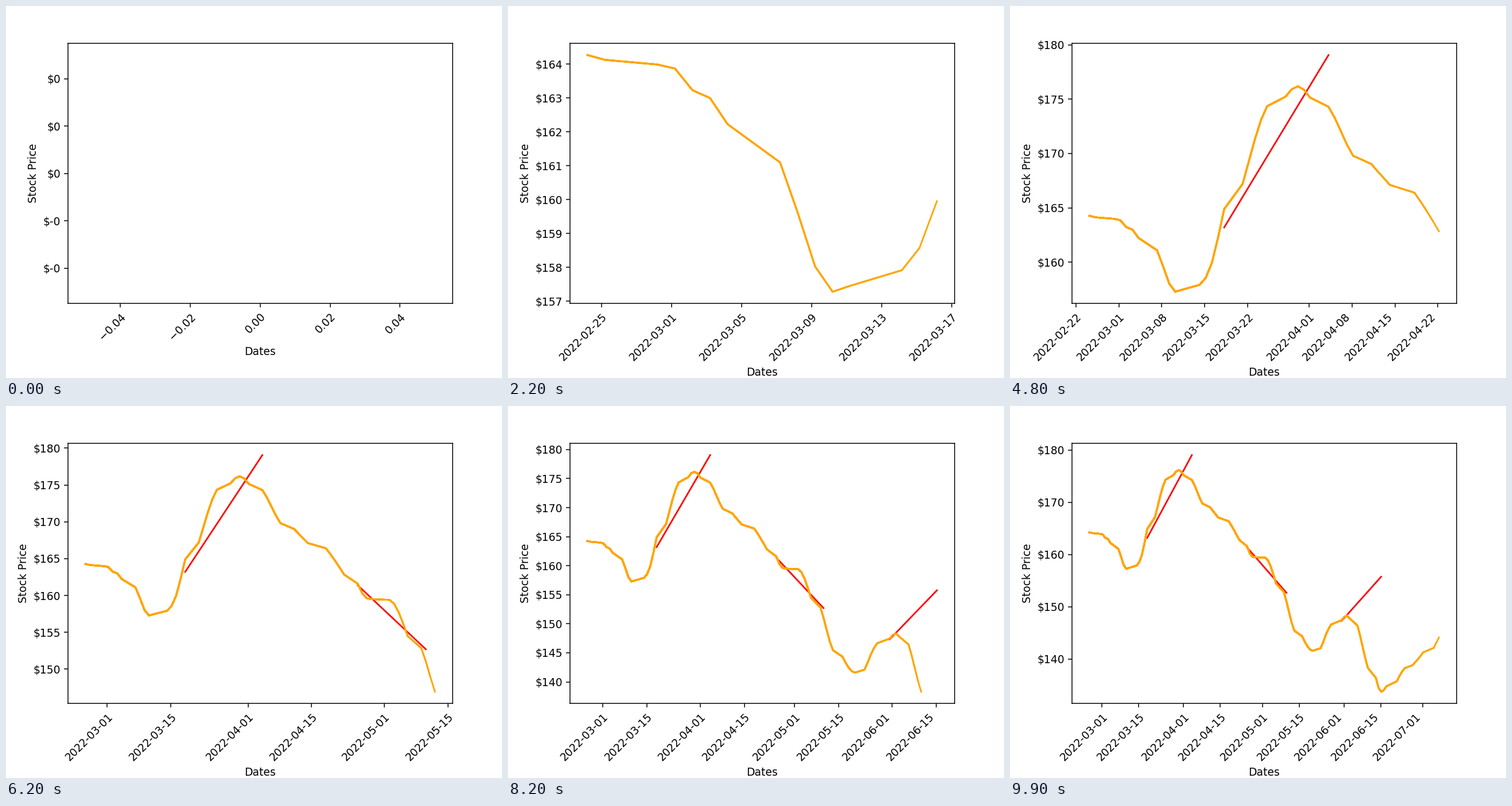
A matplotlib script for the animation above (10000 ms loop, 864x648 px).

```python
import numpy as np
import matplotlib.dates as mdates
import matplotlib.pyplot as plt
from matplotlib.animation import FuncAnimation
from matplotlib.ticker import AutoLocator, ScalarFormatter

FRAMES = 100
FIRST_CURVE = 8
EMPTY_LIMITS = (-0.055, 0.055)

# Turning points of the price curve: (trading day, price)
TURNS = [
    (0, 164.27), (2, 163.99), (3, 163.87), (4, 163.23), (5, 163.0),
    (7, 161.1), (10, 157.28), (13, 158.57), (17, 167.2), (21, 174.35),
    (24, 176.18), (27, 174.3), (31, 169.8), (36, 166.4), (40, 162.84),
    (43, 159.6), (46, 159.4), (51, 152.85), (55, 145.45), (60, 141.6),
    (64, 145.8), (68, 148.33), (74, 138.3), (77, 133.76), (82, 137.63),
    (88, 141.3), (91, 144.13),
]

# Forecast lines: first trading day -> (first price, last price)
FORECASTS = {16: (163.2, 179.06), 41: (161.38, 152.7), 66: (147.33, 155.77)}
FORECAST_SPAN = 11


def trading_days():
    """Trading days as date numbers, at New York midnight in UTC."""
    days = np.arange("2022-02-24", "2022-07-08", dtype="datetime64[D]")
    holidays = ["2022-04-15", "2022-05-30", "2022-06-20", "2022-07-04"]
    days = days[np.is_busday(days, holidays=holidays)]
    hours = np.where(days <= np.datetime64("2022-03-13"), 5, 4)
    return mdates.date2num(days) + hours / 24


def curve_through(points, count):
    """Cubic curve through the points that never overshoots them."""
    x, y = np.array(points).T
    rise = np.diff(y) / np.diff(x)
    before, after = np.r_[rise[0], rise], np.r_[rise, rise[-1]]
    slope = 2 * np.maximum(before * after, 0) / (before + after)

    day = np.arange(count)
    i = np.clip(np.searchsorted(x, day, "right") - 1, 0, len(rise) - 1)
    width = x[i + 1] - x[i]
    t = (day - x[i]) / width
    m0, m1, d = slope[i], slope[i + 1], rise[i]
    bend = 3 * d - 2 * m0 - m1 + t * (m0 + m1 - 2 * d)
    return y[i] + width * t * (m0 + t * bend)


dates = trading_days()
prices = curve_through(TURNS, len(dates))

fig, ax = plt.subplots(figsize=(6.4, 4.8), dpi=135)
fig.subplots_adjust(bottom=0.2, top=0.9)
ax.set_xlabel("Dates")
ax.set_ylabel("Stock Price")
ax.yaxis.set_major_formatter(lambda value, pos: f"${value:.0f}")

# Only the six starting ticks are anchored; ticks added later are not.
plt.setp(ax.get_xticklabels(), rotation=45, ha="right", rotation_mode="anchor")

number_axis = AutoLocator(), ScalarFormatter()
date_locator = mdates.AutoDateLocator()
date_axis = date_locator, mdates.AutoDateFormatter(date_locator)

# Each day adds one more full curve on top of the earlier ones.
layers = []
for day in range(len(dates)):
    curve, = ax.plot(dates[:day + 1], prices[:day + 1], color="orange")
    layers.append((day, curve))
    if day in FORECASTS:
        ends = dates[[day, day + FORECAST_SPAN]]
        forecast, = ax.plot(ends, FORECASTS[day], color="red")
        layers.append((day, forecast))


def update(frame):
    today = frame - FIRST_CURVE
    for day, line in layers:
        line.set_visible(day <= today)

    locator, formatter = date_axis if frame else number_axis
    ax.xaxis.set_major_locator(locator)
    ax.xaxis.set_major_formatter(formatter)

    if today < 0:
        ax.set(xlim=EMPTY_LIMITS, ylim=EMPTY_LIMITS)
    else:
        ax.relim(visible_only=True)
        ax.autoscale()
    return []


anim = FuncAnimation(fig, update, frames=FRAMES, interval=100,
                     init_func=lambda: update(0), repeat=True)
plt.show()
```
